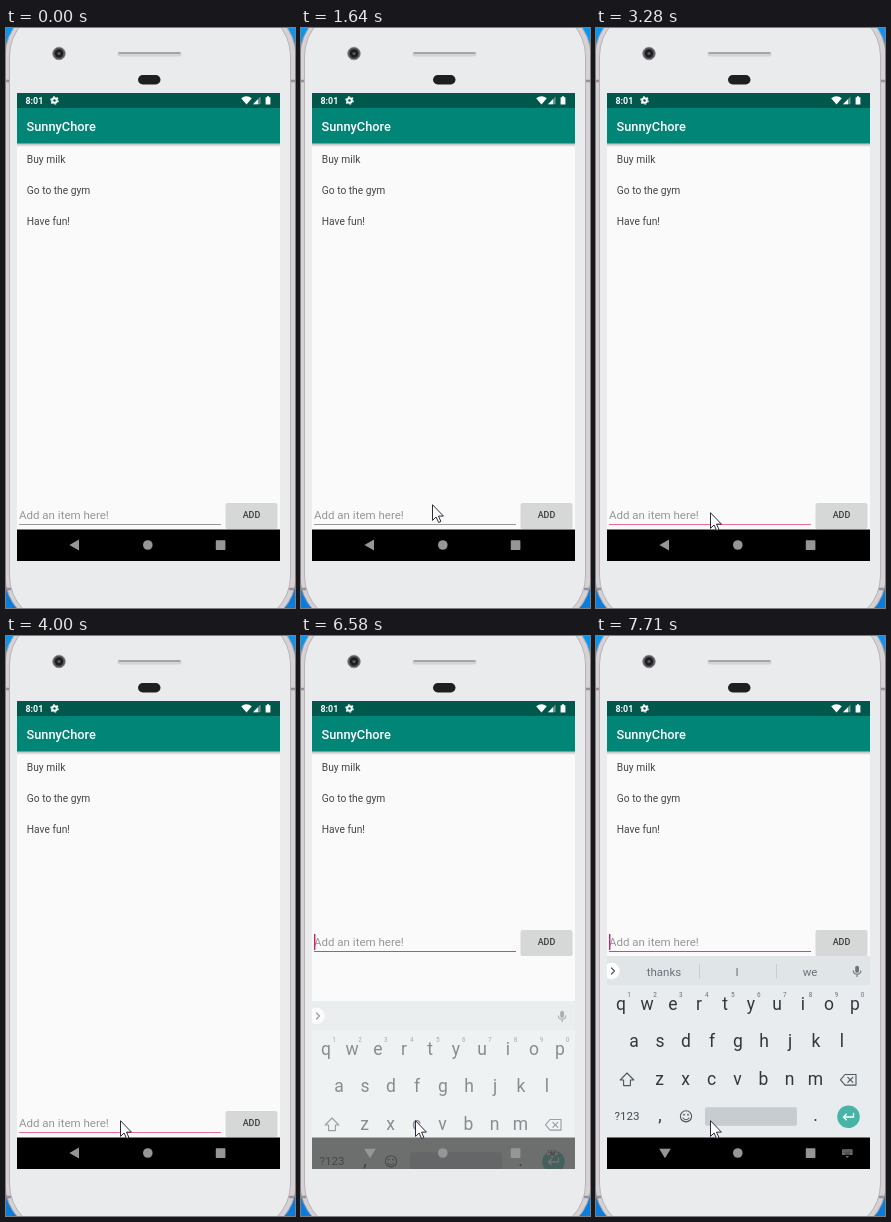
An HTML page for the animation above (8000 ms loop, 289x580 px).

```html
<!DOCTYPE html>
<html lang="en">
<head>
<meta charset="utf-8">
<title>To-do list</title>
<style>
  html, body { margin: 0; width: 100%; height: 100%; overflow: hidden; background: #0a8be8; }
  svg { display: block; width: 289px; height: 580px; font-family: Roboto, "Noto Sans", sans-serif; }
  .mid { text-anchor: middle; }
  .line { fill: none; stroke-linecap: round; stroke-linejoin: round; }
  .item { font-size: 10.24px; fill: #454545; }
  .key { font-size: 17.5px; fill: #30383d; }
  .digit { font-size: 6.4px; fill: #65707a; }
  .word { font-size: 11.5px; fill: #69737a; }
</style>
</head>
<body>
<svg viewBox="0 0 289 580" xmlns="http://www.w3.org/2000/svg">
  <defs>
    <clipPath id="screen"><rect x="11" y="65" width="263" height="468"/></clipPath>
    <linearGradient id="shade" x2="0" y2="1">
      <stop stop-color="#000" stop-opacity=".3"/>
      <stop offset="1" stop-color="#000" stop-opacity="0"/>
    </linearGradient>
    <linearGradient id="sky" x2="0" y2="1">
      <stop stop-color="#0896f4"/>
      <stop offset="1" stop-color="#0a7ddc"/>
    </linearGradient>
  </defs>
  <rect width="289" height="580" fill="url(#sky)"/>

  <!-- phone -->
  <rect x="-1" y="-22" width="291" height="620" rx="50" fill="#d6d1d4" stroke="#a39da1"/>
  <path d="M0 53H4M284 53H289M0 561H5M283 561H288" stroke="#999196" stroke-width="2.5"/>
  <rect x="3.5" y="-19" width="281" height="614" rx="47" fill="#e9ebec" stroke="#b9b2b7"/>
  <circle cx="53" cy="25.5" r="6.3" fill="#55555a" stroke="#8a8a8e" stroke-width=".8"/>
  <circle cx="53" cy="25.5" r="4.2" fill="#1d1d20"/>
  <circle cx="53" cy="25.5" r="1.6" fill="#5a5a66"/>
  <rect x="111.5" y="24" width="64" height="4.6" rx="2.3" fill="#d4d4d8"/>
  <path d="M113 25H174" class="line" stroke="#98949c" stroke-width="1.3"/>
  <rect x="132" y="47" width="22.5" height="9.4" rx="4.7" fill="#1f1f21"/>

  <g clip-path="url(#screen)">
    <rect x="11" y="65" width="263" height="468" fill="#fafafa"/>
    <rect x="11" y="115" width="263" height="4" fill="url(#shade)"/>
    <rect x="11" y="80" width="263" height="35.4" fill="#008577"/>
    <rect x="11" y="65" width="263" height="15" fill="#00574b"/>

    <!-- status bar -->
    <g fill="#fff">
      <text x="19.5" y="75.7" font-size="8.9" font-weight="700">8:01</text>
      <circle cx="48.5" cy="72.5" r="2.3" fill="none" stroke="#fff" stroke-width="2"/>
      <circle cx="48.5" cy="72.5" r="3.7" fill="none" stroke="#fff" stroke-width="1.2" stroke-dasharray="1.8 2.07"/>
      <path d="M235.2 70.2Q240.5 66.4 245.8 70.2L240.5 76.6Z"/>
      <path d="M247 76.3L254.5 68.6V76.3Z" opacity=".4"/>
      <path d="M247 76.3L252 71.2V76.3Z"/>
      <path d="M259.6 69.2H261V68.2H263V69.2H264.4V76.6H259.6Z"/>
    </g>
    <text x="20.5" y="102.6" font-size="12.8" font-weight="500" fill="#fff">SunnyChore</text>

    <text class="item" x="20.8" y="135.3">Buy milk</text>
    <text class="item" x="20.8" y="166">Go to the gym</text>
    <text class="item" x="20.8" y="196.7">Have fun!</text>

    <g id="entry">
      <text x="13" y="491.3" font-size="11.52" fill="#979797">Add an item here!</text>
      <rect id="rule" x="13" y="496" width="202"/>
      <rect id="caret" x="13" y="479" width="1.4" height="16" fill="#d81b60"/>
      <rect x="219.5" y="475.8" width="52" height="25.2" rx="1.8" fill="#000" opacity=".14"/>
      <rect x="220" y="475" width="51" height="25" rx="1.4" fill="#d6d7d7"/>
      <text class="mid" x="245.5" y="490.3" font-size="8.96" font-weight="500" fill="#3a3a3a">ADD</text>
    </g>

    <g id="board">
      <rect x="11" y="320" width="263" height="214" fill="#e8ecef"/>
      <rect x="11" y="320" width="263" height="29" fill="#e0e5e8"/>
      <circle cx="15.5" cy="335" r="8.2" fill="#fff"/>
      <path class="line" d="M15.5 332L18.5 335L15.5 338" stroke="#4b555b" stroke-width="1.2"/>
      <path id="dividers" d="M103.5 328V343M180.5 328V343" stroke="#c8ced2"/>
      <g id="words"></g>
      <g stroke="#6b757b" class="line" stroke-width="1.1">
        <rect x="259.8" y="330.2" width="2.6" height="6" rx="1.3" fill="#6b757b"/>
        <path d="M257.3 334.8Q257.6 338.3 261.1 338.3T264.9 334.8M261.1 338.3V340.6"/>
      </g>
      <g id="keys"></g>
      <g class="line" stroke="#4d575d" stroke-width="1.1">
        <path d="M31 437L37.8 444H34.4V449.6H27.6V444H24.2Z"/>
        <path d="M244.5 443.8L249 438.5H260V449.1H249ZM251.8 441.3L256.8 446.3M256.8 441.3L251.8 446.3"/>
        <circle cx="90" cy="480.3" r="5.6"/>
        <path d="M87 482Q90 485.4 93 482"/>
      </g>
      <circle cx="88" cy="478.7" r=".9" fill="#4d575d"/>
      <circle cx="92" cy="478.7" r=".9" fill="#4d575d"/>
      <text class="mid" x="31" y="484.4" font-size="11.5" fill="#3f494f">?123</text>
      <rect x="109" y="471.3" width="92" height="18.4" rx="1.6" fill="#c7ccd0"/>
      <circle cx="252.5" cy="480.7" r="11.3" fill="#47b5a6"/>
      <path class="line" d="M257.5 477.5V481H247.5M250.3 478.2L247.5 481L250.3 483.8" stroke="#fff" stroke-width="1.3"/>
    </g>

    <!-- navigation bar -->
    <rect id="nav" x="11" y="501.5" width="263" height="32"/>
    <g fill="#969696">
      <path id="back"/>
      <circle cx="141.8" cy="517" r="4.8"/>
      <rect x="209.8" y="512.3" width="9.6" height="9.6" rx=".6"/>
      <g id="switcher">
        <rect x="246" y="513.3" width="10.6" height="5.6" rx=".7" fill="#707070"/>
        <path d="M247.2 514.9H255.6M247.2 516.4H255.6" stroke="#111" stroke-width=".7" stroke-dasharray=".7 .8"/>
        <path d="M248.8 518H253.8" stroke="#111" stroke-width=".7"/>
        <path d="M249.4 520H253.2L251.3 521.9Z" fill="#707070"/>
      </g>
    </g>
  </g>

  <path id="pointer" d="M.5 .7V16.4L4.1 13L6.6 18.5L8.9 17.5L6.5 12.1H11.4Z" fill="#fff" stroke="#15152a" stroke-width=".9"/>
</svg>

<script>
const LOOP = 8000;
const el = id => document.getElementById(id);
const label = (group, cls, text, x, y) => {
  const t = document.createElementNS("http://www.w3.org/2000/svg", "text");
  t.setAttribute("class", "mid " + cls);
  t.setAttribute("x", x);
  t.setAttribute("y", y);
  t.textContent = text;
  el(group).append(t);
};

const rows = [["qwertyuiop", 25, 373.6], ["asdfghjkl", 38, 411.2], ["zxcvbnm", 63.5, 448.8]];
for (const [letters, x, y] of rows)
  [...letters].forEach((c, i) => label("keys", "key", c, x + i * 26, y));
[..."1234567890"].forEach((c, i) => label("keys", "digit", c, 33 + i * 25.95, 360.6));
label("keys", "key", ",", 64, 485);
label("keys", "key", ".", 219.5, 485);
["thanks", "I", "we"].forEach((w, i) => label("words", "word", w, 68 + i * 73, 339.5));

// time, x, y
const path = [
  [430, 271, 488], [550, 259, 493], [670, 247, 496], [820, 214, 497], [950, 186.5, 496],
  [1370, 171, 474], [1490, 153, 453], [1640, 131, 476], [1800, 121, 481],
  [1920, 117, 483], [2060, 114, 484]
];
// time, caret visible
const blink = [[0, 0], [5520, 1], [5920, 0], [6580, 1], [7280, 0], [7710, 1]];
const FOCUS = 3280, INPUT = 5520, RISE = 6580, OPEN = 6730, SUGGEST = 7000;

const at = (steps, t) => steps.filter(s => s[0] <= t).pop();
const set = (id, attrs) => {
  for (const name in attrs) el(id).setAttribute(name, attrs[name]);
};
const show = (id, on) => set(id, { visibility: on ? "visible" : "hidden" });

function draw(t) {
  const spot = at(path, t);
  show("pointer", spot);
  if (spot) set("pointer", { transform: `translate(${spot[1]} ${spot[2]})` });

  const focus = t >= FOCUS, input = t >= INPUT, up = t >= RISE;
  const rising = up && t < OPEN;
  set("rule", {
    height: focus ? 1 : 0.8,
    fill: up ? "#d6447c" : focus ? "#e86f8d" : "#808080"
  });
  show("caret", at(blink, t)[1]);
  set("entry", { transform: `translate(0 ${up ? -181 : 0})` });

  show("board", up);
  set("board", { transform: `translate(0 ${rising ? 45 : 0})`, opacity: rising ? 0.56 : 1 });
  show("dividers", t >= OPEN);
  show("words", t >= SUGGEST);

  set("nav", { opacity: rising ? 0.54 : 1 });
  set("back", { d: input ? "M63.2 512.8H74.8L69 522.2Z" : "M63.4 517L73 511.4V522.6Z" });
  show("switcher", input);
}

const start = performance.now();
function tick() {
  draw((performance.now() - start) % LOOP);
  requestAnimationFrame(tick);
}
tick();
</script>
</body>
</html>
```
